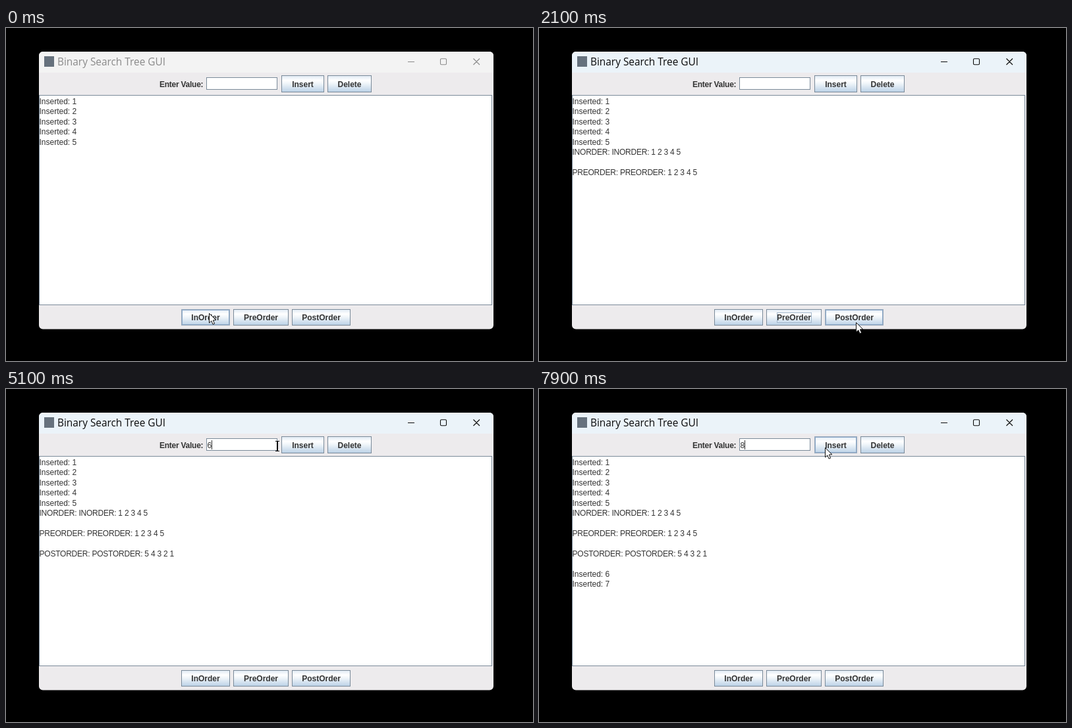
These frames come from a looping animation (800 px wide and 507 px high, 8 s). An HTML page with a canvas:

```html
<!DOCTYPE html>
<html lang="en">
<head>
<meta charset="utf-8">
<title>Binary Search Tree GUI</title>
<style>
html, body { margin: 0; width: 100%; height: 100%; overflow: hidden; background: #000; }
canvas { display: block; }
</style>
</head>
<body>
<canvas id="stage" width="800" height="507"></canvas>
<script>
const ctx = document.getElementById('stage').getContext('2d');
const LOOP = 8000, STEP = 100;
const SANS = '"Liberation Sans", Arial, sans-serif';
const EDGE = '#7a8a99', INK = '#333';

const buttons = [
  { name: 'Insert', x: 418, y: 72, w: 65, h: 26 },
  { name: 'Delete', x: 488, y: 72, w: 67, h: 26 },
  { name: 'InOrder', x: 266, y: 428, w: 74, h: 25 },
  { name: 'PreOrder', x: 345, y: 428, w: 84, h: 25 },
  { name: 'PostOrder', x: 434, y: 428, w: 89, h: 25 }
];
const field = { x: 304, y: 75, w: 108, h: 19 };

// Pointer path: time, x, y
const path = [
  [0, 308, 434], [900, 308, 434], [1000, 359, 441], [1300, 403, 437],
  [1600, 403, 437], [2100, 481, 448], [2300, 481, 448], [2400, 481, 446],
  [2600, 481, 443], [3300, 481, 443], [3400, 350, 139], [3900, 345, 85],
  [4800, 345, 85], [5200, 434, 88], [5400, 434, 88], [5700, 377, 85],
  [5900, 377, 85], [6100, 434, 88], [6900, 434, 88], [7000, 377, 85],
  [7800, 377, 85], [7900, 434, 89]
];

// Values that switch at given times
const focus = [[0, ''], [100, 'InOrder'], [1400, 'PreOrder'], [2400, 'PostOrder'],
  [4000, 'field'], [5300, 'Insert'], [5800, 'field'], [6700, 'Insert'], [7900, 'field']];
const pressed = [[0, ''], [100, 'InOrder'], [600, ''], [1400, 'PreOrder'], [1600, ''],
  [2400, 'PostOrder'], [2600, ''], [5300, 'Insert'], [5400, ''], [6700, 'Insert'], [6800, '']];
const typed = [[0, ''], [4900, '6'], [5400, ''], [5900, '7'], [6800, ''], [7900, '8']];
const caret = [[0, false], [4000, true], [4200, false], [4900, true]];

// Log lines: time, row, text
const log = [
  ...[1, 2, 3, 4, 5].map(n => [0, n - 1, 'Inserted: ' + n]),
  [600, 5, 'INORDER: INORDER: 1 2 3 4 5'],
  [1600, 7, 'PREORDER: PREORDER: 1 2 3 4 5'],
  [2600, 9, 'POSTORDER: POSTORDER: 5 4 3 2 1'],
  [5400, 11, 'Inserted: 6'],
  [6800, 12, 'Inserted: 7']
];

const at = (list, t) => list.filter(e => e[0] <= t).pop()[1];
const inside = (p, r) => p.x >= r.x && p.x <= r.x + r.w && p.y >= r.y && p.y <= r.y + r.h;
const mix = (a, b, k) => `rgb(${a.map((v, i) => Math.round(v + (b[i] - v) * k))})`;

function pointer(t) {
  const i = path.findIndex(p => p[0] > t);
  if (i < 0) return { x: path.at(-1)[1], y: path.at(-1)[2] };
  const [t0, x0, y0] = path[i - 1], [t1, x1, y1] = path[i];
  const k = (t - t0) / (t1 - t0);
  return { x: x0 + (x1 - x0) * k, y: y0 + (y1 - y0) * k };
}

function fill(x, y, w, h, color) {
  ctx.fillStyle = color;
  ctx.fillRect(x, y, w, h);
}

function outline(x, y, w, h, color) {
  ctx.strokeStyle = color;
  ctx.lineWidth = 1;
  ctx.strokeRect(x + 0.5, y + 0.5, w - 1, h - 1);
}

function text(str, x, y, font, color = INK, spacing = 0) {
  ctx.font = font;
  ctx.letterSpacing = spacing + 'px';
  ctx.fillStyle = color;
  ctx.fillText(str, x, y);
}

function poly(points) {
  ctx.beginPath();
  points.forEach(([x, y]) => ctx.lineTo(x, y));
  ctx.closePath();
}

function drawTitle(t) {
  const k = Math.min(1, t / 300);
  fill(50, 36, 690, 32, mix([243, 243, 243], [235, 243, 249], k));
  fill(58, 43, 15, 16, '#66717d');
  const ink = mix([138, 138, 138], [10, 10, 10], k);
  text('Binary Search Tree GUI', 78, 57, '15.4px "Open Sans", "Noto Sans", sans-serif', ink);
  ctx.strokeStyle = ink;
  ctx.lineWidth = 1.1;
  ctx.beginPath();
  ctx.moveTo(610, 51.5);
  ctx.lineTo(620, 51.5);
  ctx.roundRect(659.5, 46.8, 9, 9, 1.5);
  ctx.moveTo(709.5, 46.5);
  ctx.lineTo(719, 56);
  ctx.moveTo(719, 46.5);
  ctx.lineTo(709.5, 56);
  ctx.stroke();
}

function drawButton(b, t, p) {
  const { name, x, y, w, h } = b;
  const down = at(pressed, t) === name;
  const g = ctx.createLinearGradient(0, y, 0, y + h);
  g.addColorStop(0, '#dde8f3');
  g.addColorStop(0.3, '#fff');
  g.addColorStop(0.5, '#eef4f9');
  g.addColorStop(1, '#b8cfe5');
  fill(x, y, w, h, down ? '#b8cfe5' : g);
  if (!down && inside(p, b)) {
    outline(x, y, w, h, '#9aabbd');
    outline(x + 1, y + 1, w - 2, h - 2, '#8ca9c9');
  } else {
    outline(x, y, w, h, EDGE);
  }
  const mid = x + w / 2;
  ctx.textAlign = 'center';
  text(name, mid, y + (y < 100 ? 18 : 17), 'bold 12px ' + SANS);
  if (at(focus, t) === name) {
    const tw = Math.round(ctx.measureText(name).width) + 1;
    outline(Math.round(mid - tw / 2), y + (y < 100 ? 6 : 5), tw, 16, '#a3b8cc');
  }
  ctx.textAlign = 'left';
}

function drawField(t) {
  const { x, y, w, h } = field;
  fill(x, y, w, h, '#fff');
  outline(x, y, w, h, EDGE);
  const value = at(typed, t);
  text(value, x + 1.5, 90, '12px ' + SANS);
  if (at(focus, t) === 'field' && at(caret, t)) {
    fill(x + (value ? 8 : 1), 78, 1, 14, INK);
  }
}

function drawPointer(p) {
  ctx.save();
  ctx.translate(Math.round(p.x), Math.round(p.y));
  if (inside(p, field)) {
    fill(-1, -7, 2, 15, '#000');
    fill(-3, -8, 6, 1, '#000');
    fill(-3, 7, 6, 1, '#000');
  } else {
    poly([[0.5, 0.5], [0.5, 15], [3.8, 11.9], [6.1, 17.2], [8.6, 16.1], [6.3, 11], [10.8, 10.7]]);
    ctx.fillStyle = '#fff';
    ctx.fill();
    ctx.strokeStyle = '#111';
    ctx.lineWidth = 1;
    ctx.stroke();
  }
  ctx.restore();
}

function draw(t) {
  const p = pointer(t);
  fill(0, 0, 800, 507, '#000');
  ctx.save();
  ctx.beginPath();
  ctx.roundRect(50, 36, 690, 422.5, 6);
  ctx.clip();
  fill(50, 36, 690, 423, '#edebed');
  drawTitle(t);
  text('Enter Value:', 233, 90, 'bold 12px ' + SANS, INK, -0.25);
  drawField(t);
  fill(50, 102, 688, 320, '#fff');
  outline(50, 102, 688, 320, EDGE);
  for (const [from, row, str] of log) {
    if (t >= from) {
      text(str, 50.5, 116 + row * 15.42, '12px ' + SANS, INK, str[1] === 'n' ? 0 : -0.23);
    }
  }
  buttons.forEach(b => drawButton(b, t, p));
  ctx.restore();
  drawPointer(p);
}

const start = performance.now();
function tick() {
  const t = (performance.now() - start) % LOOP;
  draw(Math.floor(t / STEP) * STEP);
  requestAnimationFrame(tick);
}
tick();
</script>
</body>
</html>
```
